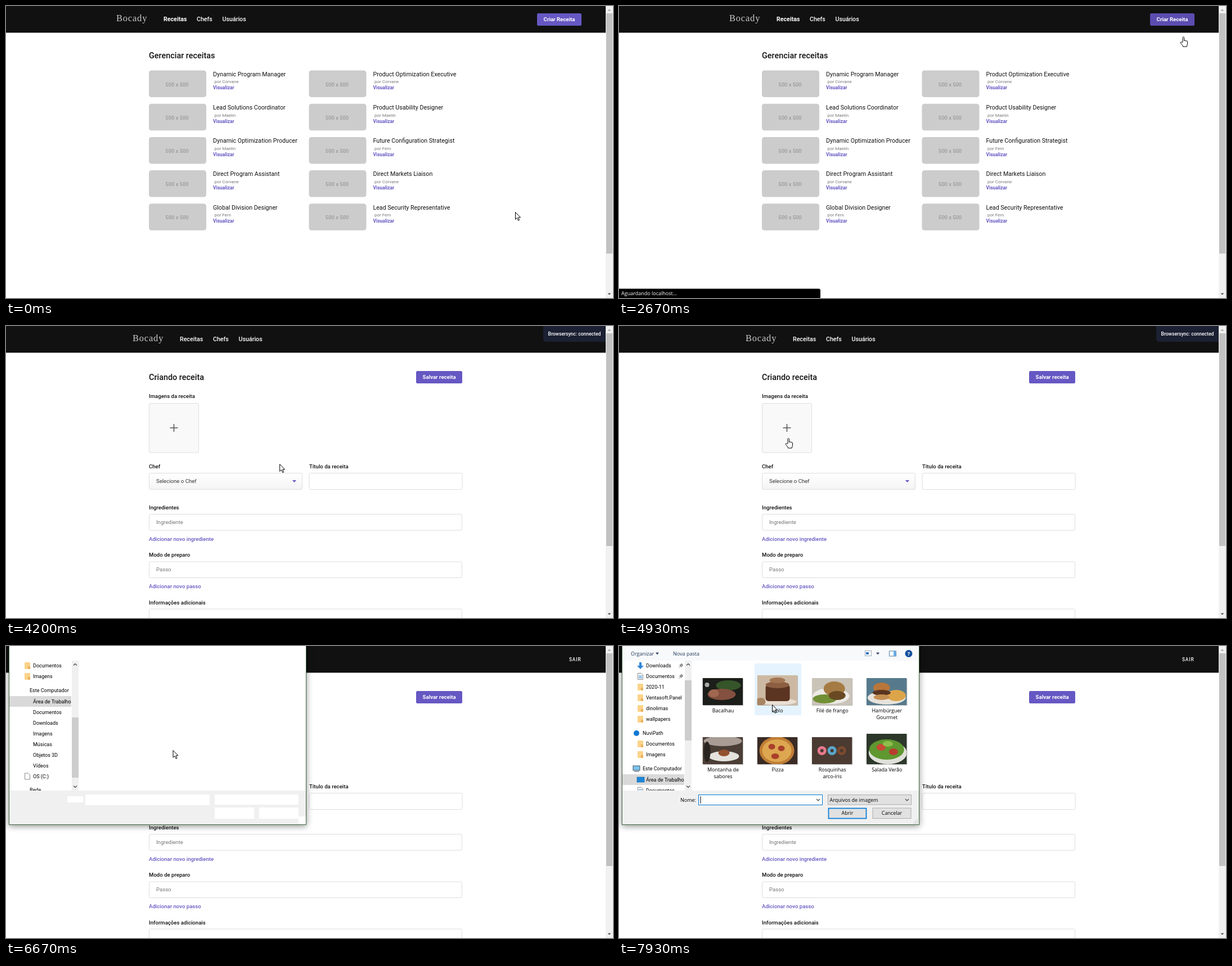
Write an HTML page that moves like this. It is 1079 px wide and 519 px high and loops after 8000 ms.

```html
<!DOCTYPE html>
<html lang="pt-BR">
<head>
<meta charset="utf-8">
<style>
html, body { margin: 0; width: 100%; height: 100%; overflow: hidden; background: #fff; }
svg { display: block; font-family: Roboto, sans-serif; white-space: pre; }
.ui { font-family: "Open Sans", "Noto Sans", sans-serif; }
.logo { font-family: "Liberation Serif", "Noto Serif", serif; letter-spacing: .8px; }
#frame { filter: drop-shadow(0 2px 6px rgba(0, 0, 0, .45)); }
</style>
</head>
<body>
<script>
const PURPLE = '#6558c3', STEP = 200 / 3, LOOP = 8000;

// Markup helpers
const attrs = o => Object.entries(o).map(([k, v]) => `${k}="${v}"`).join(' ');
const text = (x, y, s, size, fill = '#111', weight = 400, more = {}) =>
  `<text ${attrs({ x, y, 'font-size': size, fill, 'font-weight': weight, ...more })}>${s}</text>`;
const rect = (x, y, width, height, fill, more = {}) =>
  `<rect ${attrs({ x, y, width, height, fill, ...more })}/>`;
const path = (d, fill = 'none', more = {}) => `<path ${attrs({ d, fill, ...more })}/>`;
const oval = (cx, cy, rx, ry, fill) => `<ellipse ${attrs({ cx, cy, rx, ry, fill })}/>`;
const group = (id, ...parts) => `<g id="${id}">${parts.join('')}</g>`;
const chevron = (x, y, up = 1) =>
  path(`M${x - 3} ${y - 1.5 * up}l3 ${3 * up} 3 ${-3 * up}`, 'none', { stroke: '#444', 'stroke-width': 1.2 });
const triangle = (x, y, w, h, fill) => path(`M${x - w} ${y - h / 2}h${2 * w}l${-w} ${h}z`, fill);

const button = (x, y, w, label, id) =>
  rect(x, y, w, 22, PURPLE, { rx: 2.5, id }) + text(x + 11.6, y + 14, label, 9.6, '#fff', 700);

const header = (x, weight) =>
  rect(0, 0, 1066, 47.5, '#111') +
  text(x, 27, 'Bocady', 16.5, '#c8c8c8', 400, { class: 'logo' }) +
  text(x + 84, 27.4, 'Receitas', 10.67, '#fff', weight) +
  text(x + 143, 27.4, 'Chefs', 10.67, '#fff', 500) +
  text(x + 188.5, 27.4, 'Usuários', 10.67, '#fff', 500);

const scrollbar = end =>
  rect(1066, 0, 13, 519, '#f1f1f1') + rect(1067, 13, 11, end - 13, '#c1c1c1') +
  triangle(1072.5, 7, 3, -3, '#a3a3a3') + triangle(1072.5, 512, 3, 3, '#505050');

// Recipe list
const recipes = [
  ['Dynamic Program Manager', 'Corvane'], ['Product Optimization Executive', 'Corvane'],
  ['Lead Solutions Coordinator', 'Maelin'], ['Product Usability Designer', 'Maelin'],
  ['Dynamic Optimization Producer', 'Maelin'], ['Future Configuration Strategist', 'Fern'],
  ['Direct Program Assistant', 'Corvane'], ['Direct Markets Liaison', 'Corvane'],
  ['Global Division Designer', 'Fern'], ['Lead Security Representative', 'Fern']
];
const card = ([title, chef], i) => {
  const x = 254 + i % 2 * 284.5, y = 114.5 + (i >> 1) * 59.2;
  return rect(x, y, 102, 47.5, '#ccc', { rx: 4.5 }) +
    text(x + 50, y + 28, '500 x 500', 9.4, '#999', 500, { 'text-anchor': 'middle' }) +
    text(x + 114, y + 10.3, title, 10.65) +
    text(x + 116.5, y + 22.9, 'por ' + chef, 8, '#777') +
    text(x + 114, y + 33.9, 'Visualizar', 8.4, PURPLE, 700);
};
const list = group('list',
  header(196, 700), button(944, 13, 79, 'Criar Receita', 'create'),
  text(254, 92.5, 'Gerenciar receitas', 14.4, '#111', 500),
  recipes.map(card).join(''), scrollbar(440),
  group('status', path('M0 502.5H355q3 0 3 3V519H0z', '#000'),
    text(4, 514, 'Aguardando localhost...', 9, '#fff', 400, { class: 'ui' })));

// Recipe form
const field = (x, y, w, h, hint = '', fill = '#fff', color = '#777') =>
  rect(x + .5, y + .5, w - 1, h, fill, { stroke: '#ddd', rx: 2.5 }) + text(x + 13, y + 17.7, hint, 9.6, color);
const label = (x, y, s, fill) => text(x, y, s, 9.6, fill, 500);
const form = group('form',
  header(225, 500),
  text(1001, 26.8, 'SAIR', 8.2, '#fff', 500, { 'letter-spacing': .9 }),
  text(254, 95.5, 'Criando receita', 14.4, '#111', 500),
  button(729, 80, 82, 'Salvar receita', 'save'),
  label(254, 128, 'Imagens da receita'), field(254, 137, 89, 87.5, '', '#f9f9f9'),
  path('M291.5 181h14M298.5 174v14', 'none', { stroke: '#555', 'stroke-width': 1.5 }),
  label(254, 253, 'Chef'), field(254, 261, 273, 29, 'Selecione o Chef', 'url(#fade)', '#333'),
  triangle(512.5, 276, 3.6, 3.8, PURPLE),
  label(539, 253, 'Título da receita'), field(538.5, 261, 273, 29),
  label(254, 325.5, 'Ingredientes'), field(254, 334, 557, 28.5, 'Ingrediente'),
  label(254, 381.5, 'Adicionar novo ingrediente', PURPLE),
  label(254, 410, 'Modo de preparo'), field(254, 418.5, 557, 28.5, 'Passo'),
  label(254, 465.5, 'Adicionar novo passo', PURPLE),
  label(254, 494.5, 'Informações adicionais'), field(254, 502.5, 557, 60),
  scrollbar(391),
  group('sync', path('M955 0h111v28H960q-5 0-5-5z', '#1b2032'),
    text(963.5, 16.8, 'Browsersync: connected', 8.55, '#fff', 500)));

// File dialog: sidebar
const icons = {
  folder: (x, y) => rect(x, y - 6, 10, 12, '#fcd38a', { rx: 1 }) + rect(x + 6, y + 1, 4, 5, '#eab25c'),
  page: (x, y) => path(`M${x + .5} ${y - 5.5}h6l3 3v8h-9z`, '#fff', { stroke: '#888' }),
  doc: (x, y) => icons.page(x, y) + path(`M${x + 2} ${y - 1}h6m-6 2h6m-6 2h6`, 'none', { stroke: '#3f8fd6' }),
  down: (x, y) => path(`M${x + 3} ${y - 6}h4v6h4l-6 6-6-6h4z`, '#2f86d6'),
  screen: (x, y) => rect(x - 1, y - 4.5, 13, 9, '#1e86d8', { stroke: '#1a6cae', 'stroke-width': .7 }),
  computer: (x, y) => rect(x, y - 5, 12, 8, '#7cc4ee', { stroke: '#456' }) + rect(x + 2, y + 4.5, 9, 1, '#456'),
  dot: (x, y) => `<circle cx="${x + 6}" cy="${y}" r="5" fill="#1078d4"/>`
};
const entries = [
  [35, 'Downloads', 'down'], [54, 'Documentos', 'doc'], [73, '2020-11', 'folder'],
  [92, 'Ventasoft.Panel', 'folder'], [111, 'dinolimas', 'folder'], [130, 'wallpapers', 'folder'],
  [155, 'NuviPath', 'dot', 42], [174, 'Documentos', 'folder'], [193, 'Imagens', 'folder'],
  [218, 'Este Computador', 'computer', 42], [237.5, 'Área de Trabalho', 'screen'],
  [256.5, 'Documentos', 'doc'], [275.5, 'Downloads'], [294.5, 'Imagens'], [313.5, 'Músicas'],
  [332.5, 'Objetos 3D'], [351.5, 'Vídeos'], [370.5, 'OS (C:)', 'page'], [395, 'Rede', '', 42]
];
const entry = ([y, name, icon, x = 48]) => {
  const mark = icon ? icons[icon](x - (x < 48 ? 17 : 15), y) : '';
  const late = icon && icon != 'folder' && icon != 'page';
  return (late ? `<g class="late">${mark}</g>` : mark) + text(x, y + 3.3, name, 9, '#000');
};
const pin = y => path(`M106 ${y + 4}l3-3m-2-2l4 4m-3-4l3-3 3 3-3 3z`, '#999', { stroke: '#888', 'stroke-width': .8 });
const sidebar = group('sidebar',
  '<svg x="6" y="26" width="110" height="231" viewBox="6 26 110 231">',
  group('entries', rect(6, 228, 111, 19, '#d9d9d9'), entries.map(entry).join(''), pin(35), pin(54)),
  '</svg>', rect(117, 26, 12, 231, '#f0f0f0'), rect(117, 0, 12, 107, '#cdcdcd', { id: 'thumb' }),
  chevron(123, 33, -1), chevron(123, 250));

// File dialog: thumbnails as flat shapes
const donut = (x, c) => `<circle cx="${x}" cy="24" r="5.5" fill="none" stroke="${c}" stroke-width="5"/>`;
const photos = [
  ['Bacalhau', 48, '#1c1e1a', oval(46, 13, 22, 9, '#36552a') + oval(34, 29, 25, 10, '#84503f') +
    oval(20, 27, 9, 7, '#a06850') + oval(8, 12, 4, 4, '#aaa')],
  ['Bolo', 53, '#cdb9a3', oval(37, 47, 33, 6, '#e9dfd2') + rect(15, 17, 43, 29, '#5b3422', { rx: 5 }) +
    oval(36, 17, 21, 6, '#8d5f42') + oval(36, 9, 14, 5, '#a27552') + oval(6, 47, 9, 7, '#a98462')],
  ['Filé de frango', 48, '#c9c3b8', oval(34, 32, 33, 14, '#eceae4') + oval(23, 37, 21, 8, '#718f35') +
    oval(40, 19, 19, 13, '#a67b43') + oval(45, 31, 15, 8, '#684923')],
  ['Hambúrguer|Gourmet', 48, '#567a8c', oval(36, 35, 34, 12, '#e7e3dc') + oval(53, 31, 17, 10, '#dda54a') +
    oval(27, 17, 15, 9, '#b8763a') + oval(27, 26, 16, 5, '#59351f') + oval(27, 34, 14, 5, '#c48f52')],
  ['Montanha de|sabores', 48, '#4b3e36', oval(36, 7, 34, 9, '#a89c94') + oval(38, 34, 27, 9, '#e5e2de') +
    oval(38, 28, 10, 6, '#93502f') + oval(8, 26, 6, 18, '#29221f')],
  ['Pizza', 48, '#3a2c25', oval(35, 24, 31, 25, '#bf7d35') + oval(35, 24, 26, 20, '#dda650') +
    oval(26, 17, 6, 5, '#a9402a') + oval(43, 20, 6, 5, '#a9402a') + oval(32, 34, 7, 5, '#a9402a')],
  ['Rosquinhas|arco-íris', 48, '#4a3a31', donut(18, '#e5798c') + donut(36, '#5aa6cb') + donut(53, '#7b4a2e')],
  ['Salada Verão', 54, '#2c382a', oval(38, 34, 34, 20, '#dfe0da') + oval(36, 28, 31, 18, '#5f9730') +
    oval(26, 24, 8, 6, '#c94a33') + oval(48, 32, 8, 6, '#b83e2e') + oval(38, 18, 9, 5, '#8fbd4b')]
];
const photo = ([name, h, bg, shapes], i) => {
  const x = 148.5 + i % 4 * 97.1, bottom = i < 4 ? 105 : 210;
  const names = name.split('|').map((s, n) =>
    text(x + 36.5, bottom + 12.8 + 12 * n, s, 9, '#000', 400, { 'text-anchor': 'middle' }));
  return rect(x + 1, bottom - h + 1, 71.5, h, '#bbb') +
    `<svg x="${x}" y="${bottom - h}" width="71.5" height="${h}">${rect(0, 0, 72, h, bg)}${shapes}</svg>` + names.join('');
};

// File dialog: toolbar and footer
const toolbar = group('toolbar',
  rect(6, 0, 527, 26, '#f8f9fa'),
  text(21, 16.5, 'Organizar', 9, '#1e395b'), triangle(68, 13.5, 3, 3.5, '#1e395b'),
  text(96, 16.5, 'Nova pasta', 9, '#1e395b'),
  rect(437.5, 8.5, 11, 9, '#fff', { stroke: '#9ab' }), rect(439, 11, 5, 4, '#2f77c0'),
  triangle(460, 13.5, 3, 3.5, '#1e395b'),
  rect(480.5, 9, 12, 9, '#fff', { stroke: '#5580a8' }), rect(488, 9, 4.5, 9, '#6aaee6'),
  '<circle cx="515" cy="13.5" r="6.5" fill="#14519e"/>',
  text(515, 17, '?', 9.5, '#fff', 700, { 'text-anchor': 'middle' }));

const edge = (c, w = 1) => ({ stroke: c, 'stroke-width': w });
const blanks = group('blanks',
  [[109, 267, 28, 11], [141, 264, 221, 19], [371, 264, 149, 18], [371, 287, 70, 20], [450, 287, 70, 20], [520, 303, 13, 14]]
    .map(b => rect(...b, '#fff')).join(''));
const grip = [[530, 309], [530, 312], [530, 315], [527, 312], [527, 315], [524, 315]];
const controls = group('controls',
  text(137, 276.5, 'Nome:', 9, '#000', 400, { 'text-anchor': 'end' }),
  rect(141.5, 264.5, 220, 18, '#fff', edge('#0078d7')), chevron(354, 273.5),
  rect(371.5, 264.5, 148, 17.5, '#e1e1e1', edge('#adadad')), chevron(512, 273.5),
  text(374.5, 276.5, 'Arquivos de imagem', 9, '#000'),
  rect(372.5, 288.5, 67, 18, '#e1e1e1', edge('#0078d7', 1.7)),
  text(406, 300.3, 'Abrir', 9, '#000', 400, { 'text-anchor': 'middle' }),
  rect(451, 288, 68, 18.5, '#e1e1e1', edge('#adadad')),
  text(485, 300.3, 'Cancelar', 9, '#000', 400, { 'text-anchor': 'middle' }),
  grip.map(([x, y]) => rect(x - .7, y - .7, 1.5, 1.5, '#bbb')).join(''),
  rect(144.5, 267, 1, 13, '#000', { id: 'caret' }));

const dialog = '<g id="dialog" class="ui">' +
  rect(5.5, -83.5, 528, 401, '#fff', { id: 'frame', stroke: '#41663f' }) +
  rect(6, 257, 527, 60, '#f0f0f0') + blanks + controls + sidebar + toolbar +
  group('files', rect(241, 31, 83, 92, '#e5f3ff', { id: 'hover' }), photos.map(photo).join('')) + '</g>';

// Pointers, hot spot at the origin
const black = { stroke: '#000', 'stroke-width': 1, 'stroke-linejoin': 'round' };
const pointers = group('pointer',
  group('arrow', path('M.5.5V13.2l2.9-2.7 2.2 4.8 2-.9-2.1-4.6h4z', '#fff', black)),
  group('hand', path('M-1 10V2.2C-1 .2 1.6.2 1.6 2.2V7.6c0-1.1 2.2-1 2.2.3 0-1 2-.9 2 .4 0-.9 1.7-.7 1.7.8V13c0 2-1.3 3-1.3 5H-.4c0-2-2.4-4-4.1-6.3-1-1.6.5-2.7 1.7-1.5z', '#fff', black)),
  group('beam', path('M-3-6.5h2l1 1 1-1h2M-3 6.5h2l1-1 1 1h2M0-5.5v11', 'none', { stroke: '#222' })),
  group('ring', '<circle cx="11" cy=".5" r="4.5" fill="none" stroke="#3f9fe0" stroke-width="2.4"/>'));

document.body.innerHTML = `<svg width="1079" height="519" viewBox="0 0 1079 519">
<defs><linearGradient id="fade" x2="0" y2="1"><stop stop-color="#fff"/><stop offset="1" stop-color="#f4f4f4"/></linearGradient></defs>
${list}${form}${dialog}${pointers}</svg>`;

// Pointer path: time, x, y, shape from then on
const route = [
  [0, 905, 366, 'arrow'], [200, 890, 335, 'arrow'], [400, 883, 265, 'arrow'], [650, 915, 155, 'arrow'],
  [866, 956, 66, 'arrow'], [990, 980, 34, 'hand'], [1200, 1003, 25, 'hand'], [1590, 1003, 31, 'hand'],
  [2650, 1003, 31, 'hand'], [2666, 1003, 54, 'hand'], [2720, 1002, 75, 'arrow'], [2930, 980, 140, 'arrow'],
  [3200, 895, 218, 'arrow'], [3466, 793, 256, 'arrow'], [3666, 685, 275, 'beam'], [3720, 660, 276, 'arrow'],
  [4000, 545, 262, 'arrow'], [4333, 447, 234, 'arrow'], [4590, 325, 166, 'hand'], [4666, 292, 153, 'hand'],
  [4800, 274, 174, 'hand'], [4933, 301, 199, 'hand'], [5660, 300, 199, 'arrow'], [6400, 300, 199, 'arrow'],
  [6666, 296.5, 185, 'arrow'], [7000, 296.5, 185, 'arrow'], [7330, 293, 130, 'arrow'], [7600, 300, 88, 'arrow'],
  [7866, 309, 105, 'arrow'], [7933, 272, 104, 'arrow'], [LOOP, 272, 104, 'arrow']
];
const at = t => {
  const i = route.findIndex(k => k[0] > t), a = route[i - 1], b = route[i];
  const f = (t - a[0]) / (b[0] - a[0]);
  return [a[1] + (b[1] - a[1]) * f, a[2] + (b[2] - a[2]) * f, a[3]];
};

const el = id => document.getElementById(id);
const show = (id, on) => el(id).style.display = on ? '' : 'none';
const set = (id, o) => { for (const k in o) el(id).setAttribute(k, o[k]); };

function draw(t) {
  const [x, y, shape] = at(t);
  set('pointer', { transform: `translate(${x} ${y})` });
  for (const s of ['arrow', 'hand', 'beam']) show(s, s == shape);
  show('ring', t > 5730 && t < 6195);

  show('list', t < 3990);
  show('status', t > 1590);
  set('create', { fill: t > 990 ? '#5b4db0' : PURPLE });
  show('form', t > 3990);
  show('sync', t > 4190 && t < 5930);

  const [scale, opacity] = t < 6460 ? [.975, .52] : t < 6530 ? [.992, .85] : [1, 1];
  const scrolled = t < 6795;
  show('dialog', t > 6395);
  set('dialog', { opacity, transform: `translate(269.5 117) scale(${scale}) translate(-269.5 -117)` });
  show('sidebar', t > 6595);
  set('entries', { transform: `translate(0 ${scrolled ? -139 : 0})` });
  set('thumb', { y: scrolled ? 127 : 61 });
  document.querySelectorAll('.late').forEach(g => g.style.display = scrolled ? 'none' : '');
  show('blanks', t < 6730);
  show('controls', t > 6730);
  show('toolbar', !scrolled);
  show('files', t > 6865);
  show('hover', y < 123 || y > 135);
  set('hover', y > 130 ? { y: 135, height: 103 } : { y: 31, height: 92 });
  show('caret', (t - 6866 + 2 * 1060) % 1060 < 530);
}

const start = performance.now();
function tick() {
  const t = (performance.now() - start) % LOOP;
  draw(Math.min(Math.floor((t + 5) / STEP) * STEP, LOOP - 1));
  requestAnimationFrame(tick);
}
tick();
</script>
</body>
</html>
```
